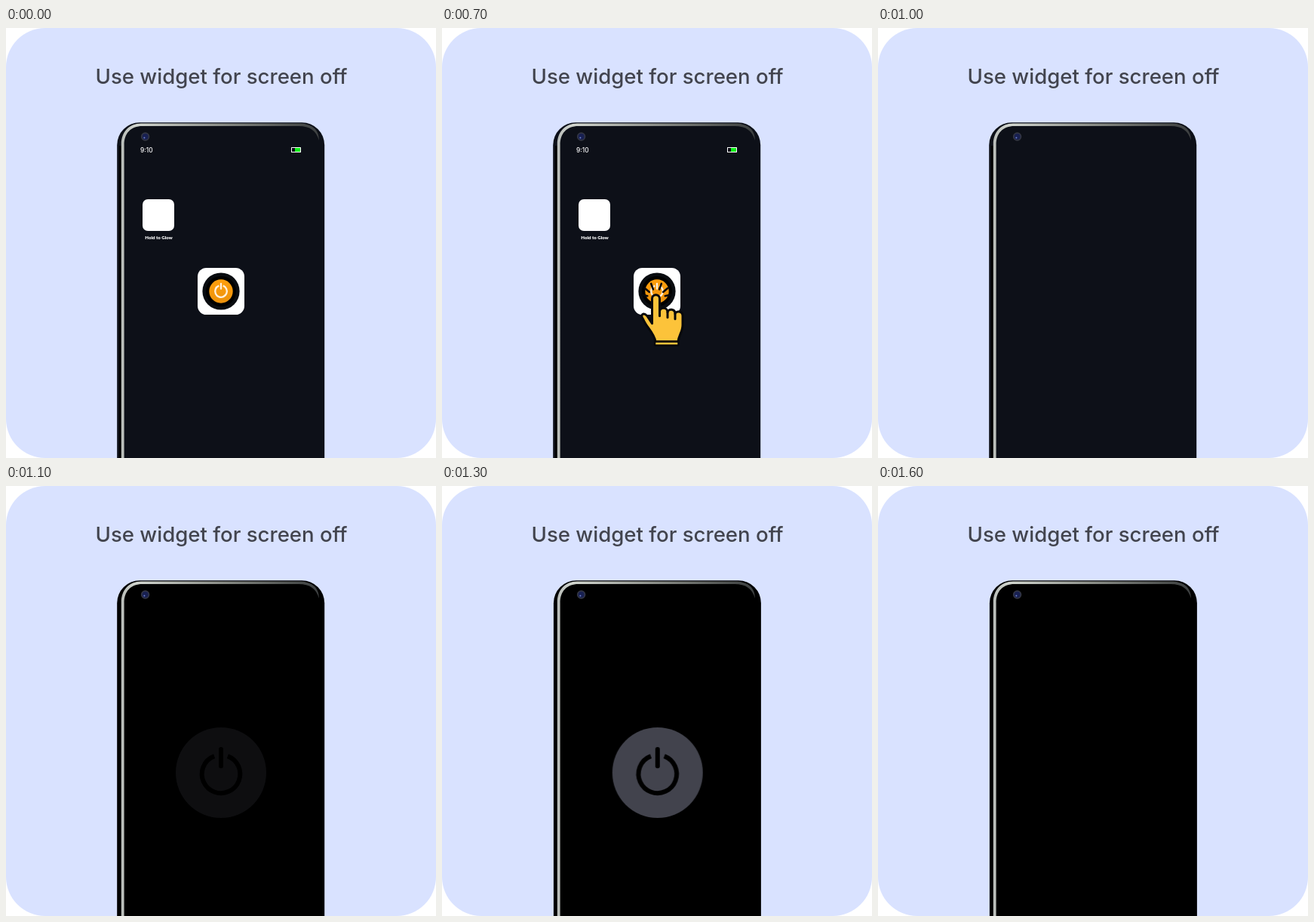
An HTML page with a canvas that plays this animation: 570 by 570 pixels, repeating every 1700 ms.

```html
<!DOCTYPE html>
<html lang="en">
<head>
<meta charset="utf-8">
<title>Screen off widget</title>
<style>
html, body { margin: 0; width: 100%; height: 100%; overflow: hidden; background: #fff; }
canvas { display: block; width: 570px; height: 570px; }
</style>
</head>
<body>
<canvas id="stage" width="570" height="570"></canvas>
<script>
const SIZE = 570, LOOP = 1700, STEP = 100;
const ctx = document.getElementById('stage').getContext('2d');

function box(c, x, y, w, h, r, fill) {
  c.beginPath();
  c.roundRect(x, y, w, h, r);
  c.fillStyle = fill;
  c.fill();
}

function disc(c, x, y, r, fill) {
  c.beginPath();
  c.arc(x, y, r, 0, Math.PI * 2);
  c.fillStyle = fill;
  c.fill();
}

function text(c, str, x, y, font, fill, align) {
  c.font = font;
  c.textAlign = align;
  c.fillStyle = fill;
  c.fillText(str, x, y);
}

// Power sign: open ring plus a stem, sized by the ring radius.
function power(c, x, y, r, width, color) {
  const gap = 0.36;
  c.strokeStyle = color;
  c.lineWidth = width;
  c.lineCap = 'butt';
  c.beginPath();
  c.arc(x, y, r, -Math.PI / 2 + gap, Math.PI * 1.5 - gap);
  c.stroke();
  c.lineCap = 'round';
  c.beginPath();
  c.moveTo(x, y - r * 1.3);
  c.lineTo(x, y - r * 0.42);
  c.stroke();
}

function layer(draw) {
  const cv = document.createElement('canvas');
  cv.width = cv.height = SIZE;
  draw(cv.getContext('2d'));
  return cv;
}

const backdrop = layer(c => {
  box(c, 0, 0, SIZE, SIZE, 52, '#d9e2ff');
  text(c, 'Use widget for screen off', 285.5, 73.5, '500 27.6px Inter, sans-serif', '#42444e', 'center');
});

const rim = layer(c => {
  c.fillStyle = '#000';
  c.fillRect(150, 156, 3, 414);
  const g = c.createLinearGradient(153, 0, 415, 0);
  g.addColorStop(0, '#b9bdb9');
  g.addColorStop(0.08, '#d2d6cf');
  g.addColorStop(0.5, '#8a8d87');
  g.addColorStop(0.85, '#505351');
  g.addColorStop(1, '#3c3f40');
  c.fillStyle = g;
  c.beginPath();
  c.moveTo(152.8, 570);
  c.lineTo(152.8, 154);
  c.bezierCurveTo(152.8, 138, 163, 126.5, 179, 126.5);
  c.lineTo(388, 126.5);
  c.bezierCurveTo(405, 126.5, 415, 134, 415, 149);
  c.bezierCurveTo(411, 136, 403, 130, 388, 130);
  c.lineTo(181, 130);
  c.bezierCurveTo(165, 130, 156.6, 140, 156.6, 155);
  c.lineTo(156.6, 570);
  c.fill();
  disc(c, 184.6, 144, 5.7, '#343744');
  disc(c, 184.6, 144, 4, '#182051');
  disc(c, 183.4, 145.4, 1, '#7285d8');
});

const home = layer(c => {
  text(c, '9:10', 178, 165, '500 8.3px Inter, sans-serif', '#fff', 'left');
  box(c, 378, 158, 13, 7, 0.5, '#fff');
  box(c, 379, 159, 11, 5, 0, '#0d1018');
  box(c, 383, 159, 7, 5, 0, '#0ff01a');
  box(c, 181, 227, 42, 42, 7, '#fff');
  text(c, 'Hold to Glow', 202.5, 279.5, '900 6.1px Lato, sans-serif', '#fff', 'center');

  box(c, 254, 318, 62, 62, 11.5, '#fff');
  disc(c, 285, 349, 24.6, '#090c10');
  disc(c, 285, 349, 20, '#000');
  const g = c.createLinearGradient(0, 333, 0, 365);
  g.addColorStop(0, '#ff9f0c');
  g.addColorStop(1, '#ec920c');
  disc(c, 285, 349, 15.7, g);
  power(c, 285, 349, 7.8, 2.3, '#fff0dc');
});

const hand = layer(c => {
  c.translate(0, 0.7);
  c.lineJoin = c.lineCap = 'round';
  c.strokeStyle = '#06080b';
  c.lineWidth = 2.6;
  for (const deg of [-78, -50, -20, 20, 50, 78]) {
    const a = deg * Math.PI / 180, s = Math.sin(a), k = Math.cos(a);
    c.beginPath();
    c.moveTo(284 + s * 12, 357 - k * 12);
    c.lineTo(284 + s * 20, 357 - k * 20);
    c.stroke();
  }
  c.lineWidth = 3;
  c.fillStyle = '#fcc33a';
  c.beginPath();
  c.moveTo(278.5, 391);
  c.lineTo(278.5, 358);
  c.arc(283.5, 358, 5, Math.PI, 0);
  c.lineTo(288.5, 375);
  c.bezierCurveTo(289, 369, 299, 369, 299, 376);
  c.bezierCurveTo(300, 371, 309, 371, 309, 378);
  c.bezierCurveTo(310, 374, 319, 374, 319, 381);
  c.lineTo(319, 393);
  c.bezierCurveTo(319, 402, 314, 406, 313, 415);
  c.lineTo(283, 415);
  c.bezierCurveTo(281, 403, 271, 396, 267, 386);
  c.bezierCurveTo(262, 379, 267, 376, 272, 381);
  c.closePath();
  c.fill();
  c.stroke();
  c.beginPath();
  for (const [x, y] of [[288.5, 374], [299, 376], [309, 378]]) {
    c.moveTo(x, y);
    c.lineTo(x, y + 7);
  }
  c.stroke();
  c.beginPath();
  c.roundRect(282, 415, 31.5, 5, 1.5);
  c.fill();
  c.lineWidth = 2.5;
  c.stroke();
});

const badge = layer(c => {
  disc(c, 285, 380, 60, '#42434d');
  power(c, 285, 381.8, 25.3, 6, '#000');
});

const clamp = v => Math.max(0, Math.min(1, v));

function put(img, alpha, x = 0) {
  ctx.globalAlpha = alpha;
  ctx.drawImage(img, x, 0);
  ctx.globalAlpha = 1;
}

function draw(ms) {
  const t = Math.floor((ms % LOOP) / STEP) * STEP;
  const dark = t >= 1100;
  const shift = t >= 1300 ? 0.7 : 0;

  ctx.clearRect(0, 0, SIZE, SIZE);
  put(backdrop, 1);
  box(ctx, 147.2 + shift, 125.3, 275, 480, 30, dark ? '#000' : '#0d1018');
  put(rim, 1);

  if (t < 1000) {
    put(home, 1);
    if (t >= 500) put(hand, clamp(0.2 + (t - 500) / 250));
  }
  // The badge glows up to its peak at 1300 ms and dims again.
  if (dark && t < 1600) put(badge, clamp(1 - Math.abs(t - 1300) / 255), shift);
}

function tick(now) {
  draw(now);
  requestAnimationFrame(tick);
}
draw(0);
requestAnimationFrame(tick);
</script>
</body>
</html>
```
